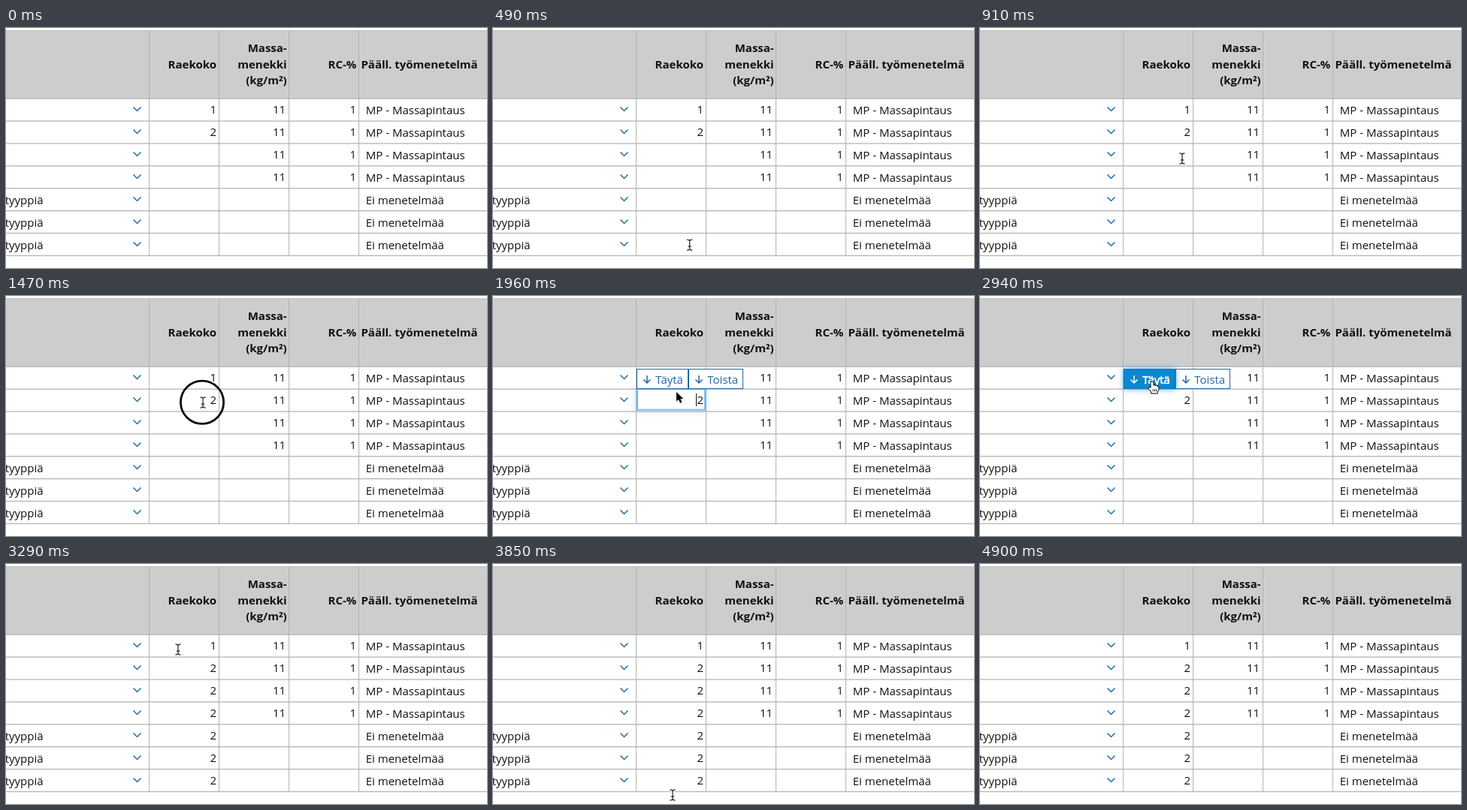
These frames come from a looping animation (640 by 320 pixels, 4.97 s). An HTML page with a canvas:

```html
<!DOCTYPE html>
<html lang="fi">
<head>
<meta charset="utf-8">
<style>
  html, body { margin: 0; width: 100%; height: 100%; overflow: hidden; background: #fff; }
  canvas { display: block; }
</style>
</head>
<body>
<canvas id="stage" width="640" height="320"></canvas>
<script>
const ctx = document.getElementById('stage').getContext('2d');
const LOOP = 4970, FOCUS = 1520, PRESS = 2310, BLUR = 2450, FILL = 3080;
const FONT = '15px "Open Sans", sans-serif';
const BLUE = '#2166a5', INK = '#111';

// Pointer path: time, x, y
const path = [
  [280, 259, 330], [910, 269, 174], [1330, 262, 142], [1680, 262, 142],
  [1960, 244, 128], [2240, 229, 114], [3500, 229, 114], [3850, 239, 308], [3920, 241, 345]
];

function pointerAt(t) {
  const i = path.findIndex(k => k[0] > t);
  const [a, b] = [path[i - 1], path[i]];
  const p = (t - a[0]) / (b[0] - a[0]);
  const s = p * p * (3 - 2 * p);
  return [a[1] + (b[1] - a[1]) * s, a[2] + (b[2] - a[2]) * s];
}

function text(str, x, y, align = 'left', color = INK, weight = '') {
  ctx.font = `${weight} ${FONT}`;
  ctx.textAlign = align;
  ctx.fillStyle = color;
  ctx.fillText(str, x, y);
}

function rect(x, y, w, h, color) {
  ctx.fillStyle = color;
  ctx.fillRect(x, y, w, h);
}

function stroke(d, color, width) {
  ctx.strokeStyle = color;
  ctx.lineWidth = width;
  ctx.stroke(new Path2D(d));
}

function withGlow(draw) {
  ctx.save();
  ctx.shadowColor = 'rgba(70,155,235,.85)';
  ctx.shadowBlur = 8;
  draw();
  ctx.restore();
}

function table(filled) {
  rect(0, 0, 640, 320, '#fff');
  rect(0, 3, 640, 91, '#cdcdcd');
  rect(0, 3, 640, 1, '#bebebe');
  for (let i = 0; i < 8; i++) rect(0, 93.5 + i * 29.9, 640, 1.4, '#b9b9b9');
  for (let x = 190; x < 500; x += 93) rect(x, 3, 1, 300, '#b3b3b3');

  text('Raekoko', 280, 53.5, 'right', INK, 'bold');
  ['Massa-', 'menekki', '(kg/m²)'].forEach((s, i) => text(s, 373.7, 32.3 + i * 21.2, 'right', INK, 'bold'));
  text('RC-%', 466.3, 53.5, 'right', INK, 'bold');
  text('Pääll. työmenetelmä', 472.4, 53.5, 'left', INK, 'bold');

  for (let row = 0; row < 7; row++) {
    const y = 113.5 + row * 30;
    const hasMass = row < 4;
    stroke(`M169.5 ${y - 8}l5 5 5-5`, '#1f6fa8', 1.5);
    if (row < 2 || filled) text(row ? '2' : '1', 280, y, 'right');
    if (hasMass) {
      text('11', 372.2, y, 'right');
      text('1', 466, y, 'right');
    } else {
      text('tyyppiä', 49.6, y + 1.5, 'right');
    }
    text(hasMass ? 'MP - Massapintaus' : 'Ei menetelmää', 478.7, y + 1.5);
  }
}

function input(t) {
  withGlow(() => {
    ctx.strokeStyle = '#7db8ee';
    ctx.lineWidth = 2;
    ctx.strokeRect(192, 124.5, 90, 27);
  });
  rect(193, 125.5, 88, 25, '#fff');
  text('2', 280, 143.5, 'right');
  if ((t - FOCUS) % 1000 < 500) rect(270, 130, 1, 17, '#111');
}

function button(label, x, w, hover, focused) {
  const box = () => rect(x, 97, w, 27, hover ? '#0b88cd' : '#fff');
  focused ? withGlow(box) : box();
  ctx.strokeStyle = hover ? '#0b78b8' : BLUE;
  ctx.lineWidth = 1;
  ctx.strokeRect(x + .5, 97.5, w - 1, 26);
  const color = hover ? '#fff' : BLUE;
  stroke(`M${x + 14} 106v10m-4.5-4.5l4.5 4.5 4.5-4.5`, color, 1.5);
  text(label, x + 25.3, 117, 'left', color);
  if (hover) {
    ctx.strokeStyle = color;
    ctx.lineWidth = .7;
    ctx.strokeText(label, x + 25.3, 117);
  }
}

function shape(d, fill, outline) {
  ctx.lineJoin = 'round';
  stroke(d, outline, 1.8);
  ctx.fillStyle = fill;
  ctx.fill(new Path2D(d));
}

const cursors = {
  beam() {
    const d = 'M-3.5-7Q0-7 0-5Q0-7 3.5-7M0-5V5M-3.5 7Q0 7 0 5Q0 7 3.5 7M-2 2H2';
    stroke(d, '#fff', 3);
    stroke(d, '#333', 1.3);
  },
  arrow() {
    shape('M0 0V12.5L3 10 5 14.8 7.4 13.8 5.3 9H9.2Z', '#000', '#fff');
  },
  hand() {
    shape('M-1.5 1Q0-1 1.5 1V5.5Q3 4.2 4.2 5.8 5.7 4.8 6.6 6.5 8.4 6 8.5 8V10.8L6.8 13.5V15.5H-1V13.5L-4.8 9Q-4.4 6.5-1.5 9.3Z', '#fff', '#000');
    stroke('M1.2 10v3.5M3.4 10v3.5M5.6 10v3.5', '#000', .8);
  }
};

function clickRing(x, y) {
  ctx.beginPath();
  ctx.arc(x, y, 28.6, 0, Math.PI * 2);
  ctx.strokeStyle = '#0a0a0a';
  ctx.lineWidth = 2.8;
  ctx.stroke();
}

function pointer(t) {
  if (t < 420 || t >= 3920) return;
  const [x, y] = pointerAt(t);
  const kind = t >= 1890 && t < 2030 ? 'arrow' : t >= 2030 && t < FILL ? 'hand' : 'beam';
  ctx.save();
  ctx.translate(x, y);
  cursors[kind]();
  if ((t >= 1470 && t < 1680) || (t >= PRESS && t < 2520)) clickRing(-1, -.3);
  ctx.restore();
}

function frame(now) {
  const t = now % LOOP;
  table(t >= FILL);
  if (t >= FOCUS && t < BLUR) input(t);
  if (t >= FOCUS && t < FILL) {
    button('Toista', 260, 73, false, false);
    button('Täytä', 191, 69, t >= 2030, t >= BLUR);
  }
  pointer(t);
  requestAnimationFrame(frame);
}
requestAnimationFrame(frame);
</script>
</body>
</html>
```
